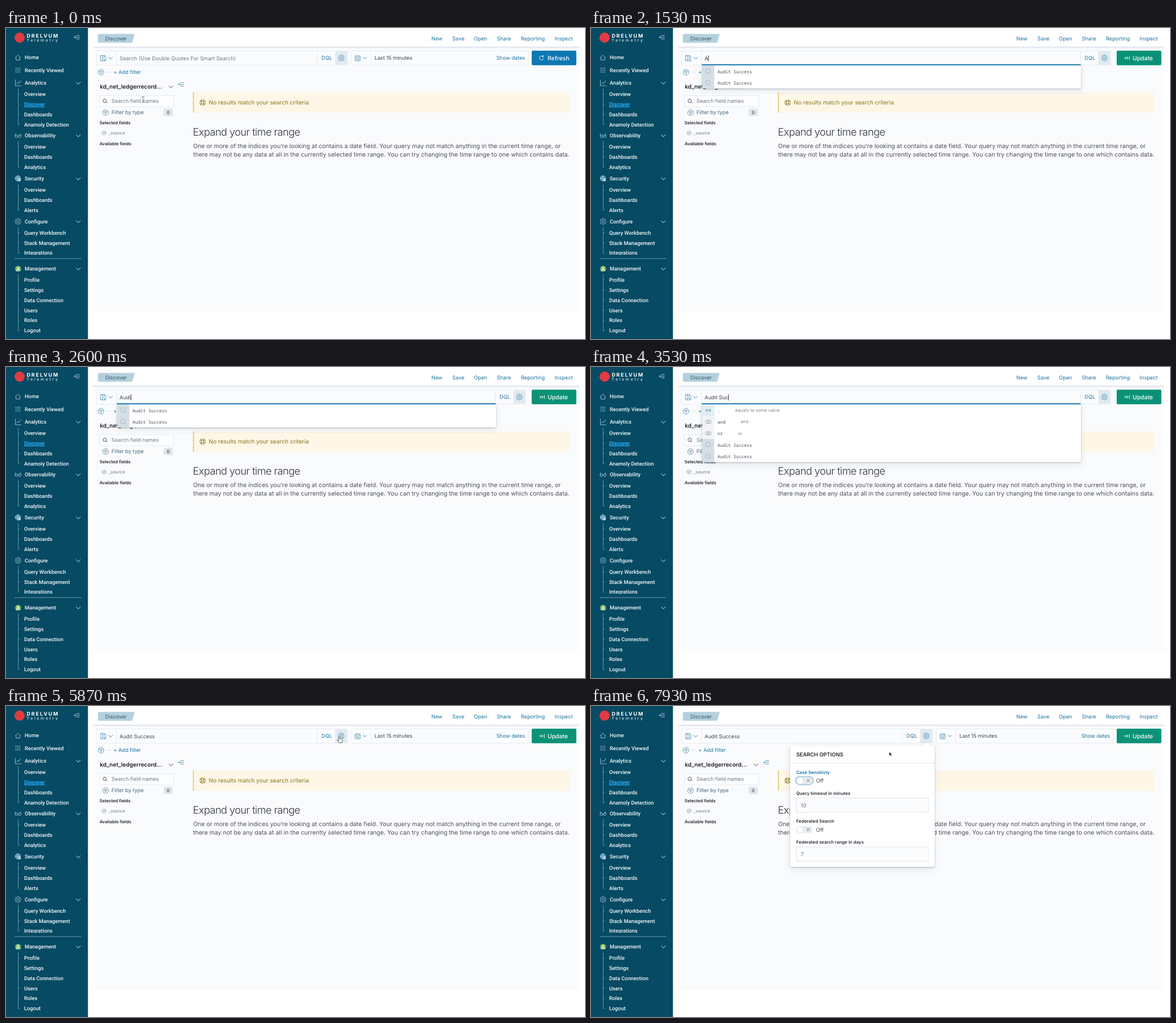
An HTML page that plays this animation: 1021 by 549 pixels, repeating every 8 s.

```html
<!DOCTYPE html>
<html lang="en">
<head>
<meta charset="utf-8">
<title>Search options</title>
<style>
html, body { margin: 0; width: 100%; height: 100%; overflow: hidden; background: #fff; }
svg { display: block; width: 1021px; height: 549px; }
text { white-space: pre; font-family: Inter, sans-serif; font-optical-sizing: none; text-rendering: geometricPrecision; }
.side { font-family: Roboto, sans-serif; }
.mono { font-family: "Noto Sans Mono", "DejaVu Sans Mono", monospace; }
</style>
</head>
<body>
<svg id="stage" viewBox="0 0 1021 549" xmlns="http://www.w3.org/2000/svg"></svg>
<script>
const LOOP = 8000;
const BLUE = '#1a739f', SOFT_BLUE = '#3b86ae', INK = '#3d414b', GRAY = '#727882', LINE = '#e6ebf0';
const ROW = 20.35;

// ---- drawing helpers ----
const text = (x, cy, s, { size = 9.2, fill = INK, weight = 400, cls = '', gap = 0, extra = '' } = {}) =>
  `<text x="${x}" y="${(cy + size * 0.36).toFixed(2)}" font-size="${size}" font-weight="${weight}" fill="${fill}"` +
  ` class="${cls}" letter-spacing="${gap}" ${extra}>${s}</text>`;
const rect = (x, y, w, h, fill, extra = '') =>
  `<rect x="${x}" y="${y}" width="${w}" height="${h}" fill="${fill}" ${extra}/>`;
const path = (d, stroke, w = 1, fill = 'none') =>
  `<path d="${d}" stroke="${stroke}" stroke-width="${w}" fill="${fill}" stroke-linecap="round" stroke-linejoin="round"/>`;
const circle = (x, y, r, fill, stroke = 'none', w = 1) =>
  `<circle cx="${x}" cy="${y}" r="${r}" fill="${fill}" stroke="${stroke}" stroke-width="${w}"/>`;
const group = (id, body) => `<g id="${id}">${body}</g>`;
const chevron = (x, y, color, r = 3.6) => path(`M${x - r} ${y - r / 2}l${r} ${r}l${r} ${-r}`, color, 1);
const lens = (x, y, color, r = 3.2) =>
  circle(x - 0.5, y - 0.5, r, 'none', color, 0.9) + path(`M${x + r * 0.6} ${y + r * 0.6}l1.9 1.9`, color, 0.9);
const funnel = (x, y, color) => circle(x, y, 5, 'none', color, 0.8) +
  path(`M${x - 3} ${y - 1.7}h6M${x - 2} ${y + 0.3}h4M${x - 0.8} ${y + 2.2}h1.6`, color, 0.8);
const collapse = (x, y, color) =>
  path(`M${x - 1} ${y - 3}h5.5M${x - 4.5} ${y}h9M${x - 1} ${y + 3}h5.5M${x - 2.7} ${y - 2}l-2 2l2 2`, color, 0.8);
const gear = (x, y, color) => {
  let d = '';
  for (let i = 0; i <= 32; i++) {
    const a = i * Math.PI / 16, r = 4.7 + 0.75 * Math.cos(8 * a);
    d += (i ? 'L' : 'M') + (x + r * Math.sin(a)).toFixed(2) + ' ' + (y - r * Math.cos(a)).toFixed(2);
  }
  return path(d + 'Z', color, 0.9) + circle(x, y, 1.8, 'none', color, 0.9);
};

// ---- sidebar ----
const sections = [
  ['Analytics', 97, ['Overview', 'Discover', 'Dashboards', 'Anamoly Detection']],
  ['Observability', 190, ['Overview', 'Dashboards', 'Analytics']],
  ['Security', 266, ['Overview', 'Dashboards', 'Alerts']],
  ['Configure', 341.7, ['Query Workbench', 'Stack Management', 'Integrations']],
  ['Management', 425, ['Profile', 'Settings', 'Data Connection', 'Users', 'Roles', 'Logout']],
];

function sidebar() {
  const label = (x, y, s, fill = '#f4f8fa', extra = '') =>
    text(x, y, s, { size: 9.3, fill, weight: 500, cls: 'side', extra });
  const pale = '#a9c8d6', branch = '#7fa9bb';
  let s = rect(0, 0, 144.5, 549, '#064a63') + circle(24, 17, 9, '#e23b41') +
    text(36.5, 13.6, 'DRELVUM', { size: 9, fill: '#fff', weight: 700, gap: 1.85 }) +
    text(36.5, 21.8, 'Telemetry', { size: 6.8, fill: '#e3eef2', weight: 500, gap: 2.75 }) +
    collapse(125, 16.3, '#d5e5ec') +
    path('M16.5 52.3L21 47.8l4.5 4.5M17.6 51.5v5h6.8v-5', pale, 0.9);
  for (let i = 0; i < 9; i++) s += rect(16.8 + (i % 3) * 3.3, 70.3 + Math.floor(i / 3) * 3.3, 1.6, 1.6, pale);
  s += label(33, 52, 'Home') + label(33, 74.5, 'Recently Viewed');
  s += path('M16.5 92v10h10M18.5 99l2.5-3l2 1.5l3-4.5', pale, 0.9);
  s += circle(18.3, 191, 2.3, 'none', pale, 0.9) + circle(24, 191, 2.3, 'none', pale, 0.9) +
    path('M16 190l1-3.5M26.3 190l-1-3.5M20.6 190.5h1.1', pale, 0.8);
  s += circle(21, 265.5, 4.8, '#4f93b3', pale, 0.8) + path('M16.5 265.5h9M21 261v9', '#d5e8f0', 0.7) +
    circle(24, 268.5, 2.2, '#b9dcea');
  s += gear(21.2, 341.7, pale);
  s += circle(21.3, 425, 5.3, '#62b67d') + circle(21.3, 424, 2.3, '#f5d77b') +
    path('M18 428.5q3.3-4 6.6 0', '#f5e9cf', 1.6);
  for (const [name, y, items] of sections) {
    s += label(33, y, name) + chevron(127.5, y + 0.3, '#e8f1f5');
    s += path(`M21.5 ${y + 10}V${y + 19.8 + (items.length - 1) * 17.8}`, branch, 0.8);
    items.forEach((item, i) => {
      const cy = y + 19.8 + i * 17.8;
      const on = item === 'Discover';
      s += path(`M21.5 ${cy}h2`, branch, 0.8) +
        label(32, cy, item, on ? '#27a9f3' : undefined, on ? 'text-decoration="underline" stroke="#27a9f3" stroke-width=".3"' : '');
    });
  }
  return s + rect(15, 400.5, 120, 5, '#064a63') + rect(15, 406.5, 118, 1, '#6f9bae');
}

// ---- page ----
function page() {
  let s = rect(154, 34, 857, 466.7, '#fafbfd') +
    rect(154, 33, 857, 1, '#d8dfe6') + rect(154, 34, 857, 2, '#eef1f5') +
    '<path d="M164 10.5H227L222.5 26H164Q162 26 162 24V12.5Q162 10.5 164 10.5Z" fill="#b5d0dd"/>' +
    text(175, 18.3, 'Discover', { fill: '#2f576a' });
  [['New', 750], ['Save', 787], ['Open', 825], ['Share', 865.5], ['Reporting', 908], ['Inspect', 967.5]]
    .forEach(([t, x]) => s += text(x, 18.3, t, { fill: BLUE }));
  s += funnel(167.5, 78, SOFT_BLUE) + rect(177.5, 77.6, 7, 0.8, '#c9d3dc') + text(189.5, 77.8, '+ Add filter', { fill: BLUE });
  s += text(165.5, 103.7, 'kd_net_ledgerrecord...', { size: 10, weight: 600, fill: '#1d1f26' }) +
    chevron(291, 104, INK) + collapse(309, 99.5, SOFT_BLUE);
  s += rect(165, 119.5, 131, 19.5, '#fcfdfe', `stroke="${LINE}"`) + lens(174.5, 129, INK, 3) +
    text(186, 129, 'Search field names', { fill: GRAY });
  s += funnel(175.5, 149.3, '#4f7b93') + text(186, 149, 'Filter by type', { fill: '#41677c' }) +
    rect(278, 142.5, 16, 13, '#e0e5ec', 'rx="1.5"') + text(283.6, 149, '0', { size: 7.8, weight: 500 });
  const head = { size: 7.65, weight: 600, fill: '#25272e' };
  s += text(165, 167.3, 'Selected fields', head) + text(165, 203.8, 'Available fields', head) +
    circle(173, 185.2, 5.2, '#e6e8ec') +
    path('M171 183.7l-1.8 1.5l1.8 1.5M175 183.7l1.8 1.5l-1.8 1.5M173.6 183l-1.2 4.4', '#8d939e', 0.7) +
    text(181, 185.3, '_source', { size: 7.8, fill: GRAY });
  const olive = '#857619';
  s += rect(330, 114, 664, 35.5, '#fef6e7') +
    '<path d="M330.5 114V149.5" stroke="#c5b71f" stroke-width="1.6" stroke-dasharray="2 1"/>' +
    circle(346.7, 131.6, 4.8, 'none', olive, 0.9) + circle(346.7, 131.6, 2.2, 'none', olive, 0.8) +
    path('M343.3 128.2l1.8 1.8M350.1 128.2l-1.8 1.8M343.3 135l1.8-1.8M350.1 135l-1.8-1.8', olive, 1.3) +
    text(357.5, 131.8, 'No results match your search criteria', { size: 10.15, fill: olive });
  s += text(329.5, 183, 'Expand your time range', { size: 18.2, weight: 300, gap: -0.55, fill: '#30333d' });
  const body = { size: 10.57, fill: '#4c4f59' };
  s += text(330, 208, 'One or more of the indices you’re looking at contains a date field. Your query may not match anything in the current time range, or', body) +
    text(330, 223.3, 'there may not be any data at all in the currently selected time range. You can try changing the time range to one which contains data.', body);
  return s;
}

// ---- query bar ----
const frame = (x, w) => rect(x, 40.5, w, 25, '#fbfcfd', `stroke="${LINE}" stroke-width=".9"`);
const bar = edge => frame(160, 35) +
  path('M167 48.5h7l2 2v7.5h-9zM169.5 48.5v3h4v-3M169.5 58v-3.5h4v3.5', SOFT_BLUE, 0.8) + chevron(184.5, 53.3, SOFT_BLUE) +
  frame(195, edge - 195) + frame(edge, 32) + text(edge + 7.3, 52.7, 'DQL', { fill: BLUE }) +
  rect(edge + 32, 40.5, 21.5, 25, '#e2eaf1') + gear(edge + 42.2, 53, SOFT_BLUE);
const narrow = () => bar(549) + frame(609, 312) + rect(643, 41, 0.9, 24, LINE) +
  rect(615.5, 49.5, 9, 8.5, 'none', `stroke="${SOFT_BLUE}" stroke-width=".8" rx="1"`) +
  path('M615.5 52h9M618 48.5v1.5M622 48.5v1.5M617.5 54.2h5M617.5 56.2h5', SOFT_BLUE, 0.7) +
  chevron(633, 53, SOFT_BLUE, 2.6) + text(649.7, 52.9, 'Last 15 minutes') + text(864.7, 52.9, 'Show dates', { fill: BLUE });
const wide = () => bar(863) + rect(195.5, 64, 668, 1.8, '#1176ad');
const button = (fill, icon, label) => rect(927, 40, 78.7, 25.8, fill, 'rx="2"') + icon +
  text(955, 53, label, { size: 10.4, weight: 500, fill: '#fff' });
const refresh = () => button('#0d77b3', path('M947 50.3a3.7 3.7 0 1 0 1 3.2M947.5 48.3v2.3h-2.3', '#fff', 0.9), 'Refresh');
const update = () => button('#0a9276', path('M941 53h6M945 50.5l2.5 2.5l-2.5 2.5M949.5 50v6M942.5 51.5v3', '#fff', 0.9), 'Update');

// ---- suggestions ----
const rings = (y, color, fill = 'none') => circle(205.2, y, 3.1, fill, color, 0.9) + circle(208.8, y, 3.1, 'none', color, 0.9);
const tints = { field: '#fdf9e4', equals: '#e3edf3', joiner: '#f1f3f6', value: '#d3dfe5' };
const icons = {
  field: y => rings(y, '#a89a2b', '#dccf66'),
  equals: y => path(`M204.8 ${y - 2}l-2.2 2l2.2 2M209.2 ${y - 2}l2.2 2l-2.2 2M205.7 ${y}h2.6`, '#1f6f96', 1),
  joiner: y => rings(y, '#989ea8'),
  value: y => lens(206.5, y, '#a3b4bd', 4),
};
function suggestions(id, rows, size, height) {
  const step = size * 0.6;
  let body = '';
  rows.forEach(([kind, name, note], i) => {
    const y = 76.4 + i * ROW;
    body += rect(196, 66 + i * ROW, 21.5, ROW + 0.3, tints[kind]) + icons[kind](y) +
      text(223, y + 0.3, name, { size, cls: 'mono', fill: '#4a4e58' });
    if (note) body += text(249.6 + step * name.length, y - 0.1, note, { size: 7.85, fill: '#7f858f' });
  });
  return group(id, rect(196, 66, 668, height, '#fff', 'filter="url(#soft)"') +
    `<clipPath id="${id}Clip">${rect(196, 66, 668, height, '#000')}</clipPath><g clip-path="url(#${id}Clip)">${body}</g>`);
}
const fields = ('access_qry access_result admin_flag code code_desc commit_time dst_domain dst_file_name dst_handle_id ' +
  'dst_host dst_object_name dst_object_type dst_proc_id dst_proc_name dst_session_id').split(' ')
  .map(f => ['field', f, 'Filter results that contain ' + f]);
const values = [['value', 'Audit Success'], ['value', 'Audit Success']];
const operators = [['equals', ':', 'equals to some value'], ['joiner', 'and', 'and'], ['joiner', 'or', 'or'], ...values];

// ---- options popover ----
function options() {
  const label = (y, s, fill = '#2c2e36') => text(362, y, s, { size: 7.85, weight: 600, fill });
  const toggle = y => rect(362, y - 6, 29, 12, '#e9edf2', 'rx="6"') + circle(368.5, y, 5.8, '#fff', '#d3d9e1', 0.8) +
    path(`M380.3 ${y - 2.5}l5 5M385.3 ${y - 2.5}l-5 5`, '#5d636f', 0.9) + text(396.7, y, 'Off');
  const input = (y, s) => rect(362, y, 233, 25.5, '#fbfcfd', 'stroke="#e0e6ed"') + text(370, y + 12.8, s, { fill: '#6a6f79' });
  return '<g filter="url(#soft)">' + rect(351, 70, 255, 214, '#fff', 'rx="2"') + '<path d="M586 70.5L592 65L598 70.5Z" fill="#fff"/></g>' +
    text(362, 85.3, 'SEARCH OPTIONS', { size: 9.3, weight: 600, fill: '#25272e' }) + rect(351, 100.5, 255, 0.9, '#dbe1e8') +
    label(117, 'Case Sensitivty', '#14749f') +
    rect(361, 124.7, 31, 14, 'none', 'rx="7" stroke="#a3cbe0" stroke-width="2"') + toggle(131.7) +
    label(154, 'Query timeout in minutes') + input(162.4, '10') +
    label(203.3, 'Federated Search') + toggle(218.2) +
    label(240.5, 'Federated search range in days') + input(248.7, '7');
}

// ---- pointers, each drawn around its centre or tip ----
const beam = () => path('M-2-5q2 0 2 1.5v7q0 1.5-2 1.5M2-5q-2 0-2 1.5M2 5q-2 0-2-1.5', '#555', 0.8);
const hand = () => path('M-1.2-4q1.2-1.5 2 0v3.2q1-.8 1.7.2q1-.5 1.5.4q1.2-.2 1.2 1.2v2.5l-1.2 3h-4.5l-3.3-4.5q.5-1.5 2.6.3z', '#333', 0.8, '#fff');
const arrow = () => path('M0-2v7l1.6-1.5l1.2 2.8l1.2-.5l-1.2-2.7h2.2z', '#fff', 0.6, '#111');

const stage = document.getElementById('stage');
stage.innerHTML =
  '<defs><filter id="soft" x="-10%" y="-15%" width="120%" height="140%">' +
  '<feDropShadow dx="0" dy="1" stdDeviation="1.2" flood-color="#3a4757" flood-opacity=".35"/>' +
  '<feDropShadow dx="0" dy="4" stdDeviation="6" flood-color="#3a4757" flood-opacity=".1"/></filter></defs>' +
  page() + group('narrow', narrow()) + group('wide', wide()) +
  group('refresh', refresh()) + group('update', update()) +
  group('hint', text(200.3, 53.6, 'Search (Use Double Quotes For Smart Search)', { size: 9.33, fill: GRAY })) +
  text(200.3, 53.6, '', { extra: 'id="query"' }) + rect(0, 48.3, 0.9, 10.5, '#222', 'id="caret"') +
  suggestions('fields', fields, 7.2, 298) + suggestions('values', values, 7.85, 2 * ROW) +
  suggestions('operators', operators, 7.85, 5 * ROW) +
  group('scroll', rect(857, 70, 3.5, 80.5, '#b4b8bf')) +
  group('options', options()) + sidebar() +
  group('pointer', group('beam', beam()) + group('hand', hand()) + group('arrow', arrow()));

const el = id => document.getElementById(id);
const show = (id, on) => { el(id).style.display = on ? '' : 'none'; };

// ---- timeline ----
const FOCUS = 430, BLUR = 5470, OPEN = 6600;
const PHRASE = 'Audit Success';
const keys = [1270, 1870, 2270, 2470, 2670, 2870, 3070, 3270, 3530, 3730, 3930, 4130, 4200];
const track = [[0, 241.5, 126], [70, 241.5, 126], [430, 246, 55], [4600, 246, 55], [5150, 907, 54],
  [5480, 907, 54], [5860, 588, 58.5], [6850, 588, 58.5], [7900, 526, 83], [LOOP, 526, 83]];
const ease = p => p * p * (3 - 2 * p);

function mouse(t) {
  const i = track.findIndex(k => k[0] > t);
  const [t0, x0, y0] = track[i - 1], [t1, x1, y1] = track[i];
  const p = ease((t - t0) / (t1 - t0));
  return [x0 + (x1 - x0) * p, y0 + (y1 - y0) * p];
}

function draw(t) {
  const typed = keys.filter(k => k <= t).length;
  const focused = t >= FOCUS && t < BLUR;
  const list = !focused || t < 530 ? '' : t < 1470 ? 'fields' : t < 2870 ? 'values' : 'operators';
  show('narrow', !focused);
  show('wide', focused);
  show('refresh', !typed);
  show('update', typed);
  show('hint', !typed);
  for (const id of ['fields', 'values', 'operators']) show(id, id === list);
  show('scroll', list === 'fields');

  const query = el('query');
  query.textContent = PHRASE.slice(0, typed);
  const since = t - (typed ? keys[typed - 1] : FOCUS);
  show('caret', focused && since % 1000 < 500);
  el('caret').setAttribute('x', 200.3 + (typed ? query.getComputedTextLength() : 0));

  const opened = Math.min(1, Math.max(0, (t - OPEN) / 250));
  show('options', opened > 0);
  el('options').setAttribute('opacity', opened);
  el('options').setAttribute('transform', `translate(0 ${(5 * (1 - ease(opened))).toFixed(2)})`);

  const [x, y] = mouse(t);
  const gearX = focused ? 905 : 591;
  const overBar = y > 40 && y < 66;
  const overGear = overBar && Math.abs(x - gearX) < 11;
  const overText = overBar ? x > 195 && x < (focused ? 863 : 549) : x < 296 && y > 119 && y < 139;
  show('pointer', t < 1270 || t >= 4600);
  show('hand', overGear);
  show('beam', overText);
  show('arrow', !overGear && !overText);
  el('pointer').setAttribute('transform', `translate(${x.toFixed(1)} ${y.toFixed(1)})`);
}

const start = performance.now();
function tick() {
  draw((performance.now() - start) % LOOP);
  requestAnimationFrame(tick);
}
tick();
</script>
</body>
</html>
```
